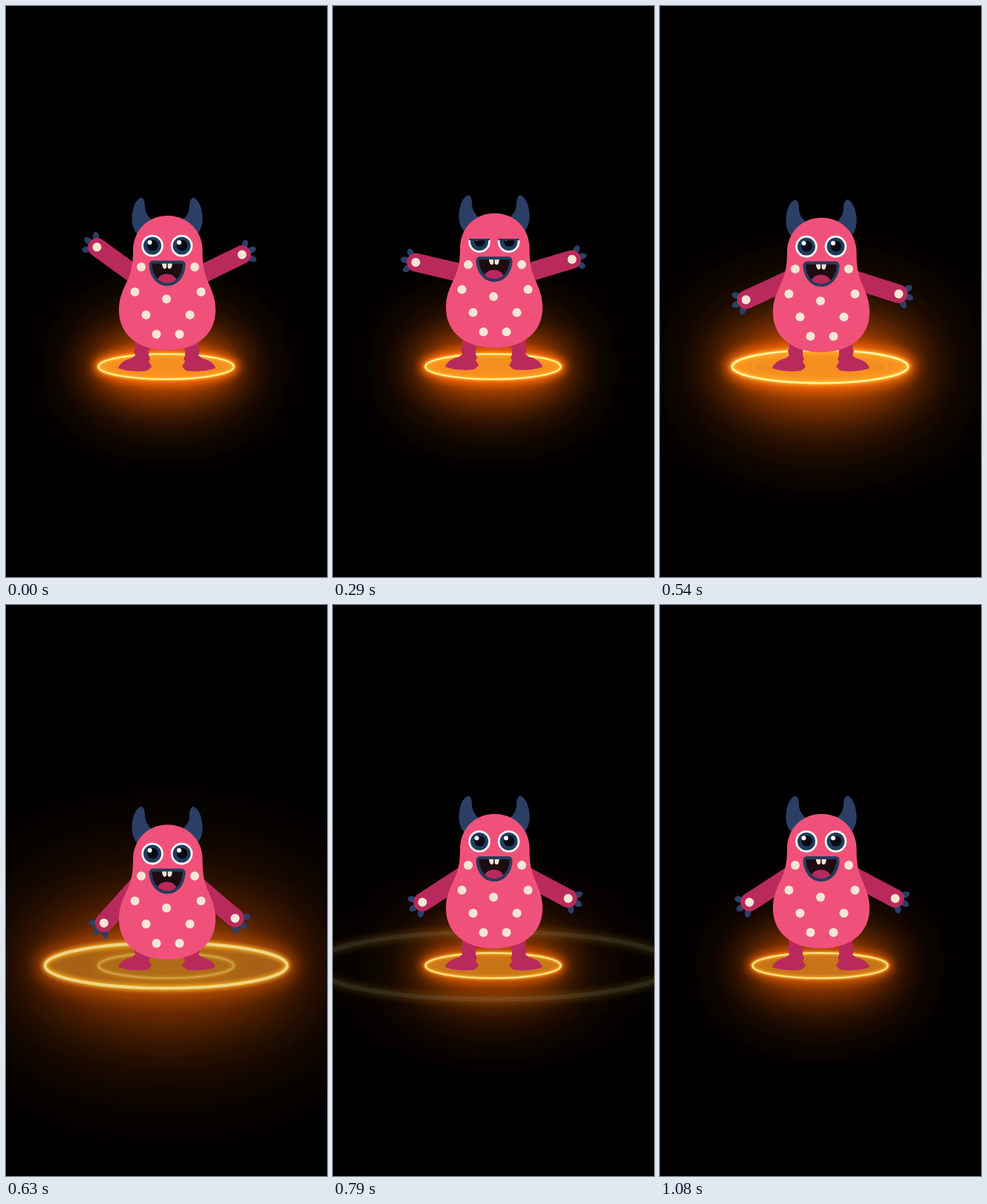
These frames come from a looping animation (432x768 px, 1.12 s). An HTML page:

```html
<!DOCTYPE html>
<html lang="en">
<head>
<meta charset="utf-8">
<title>Jumping monster</title>
<style>
  html, body { margin: 0; width: 100%; height: 100%; overflow: hidden; background: #000; }
  svg { display: block; width: 100%; height: 100%; }
  .light { mix-blend-mode: screen; }
  .limb { fill: #b92a5c; }
  .horn { fill: #2b3f66; }
  .skin { fill: #f0517a; }
  .cream { fill: #f8e6d4; }
</style>
</head>
<body>
<svg viewBox="0 0 432 768">
  <defs>
    <filter id="wide" x="-150%" y="-300%" width="400%" height="700%"><feGaussianBlur stdDeviation="46"/></filter>
    <filter id="mid" x="-100%" y="-300%" width="300%" height="700%"><feGaussianBlur stdDeviation="24"/></filter>
    <filter id="near" x="-50%" y="-200%" width="200%" height="500%"><feGaussianBlur stdDeviation="6"/></filter>
    <filter id="soft" x="-20%" y="-60%" width="140%" height="220%"><feGaussianBlur stdDeviation="1.5"/></filter>
    <clipPath id="eyeClip"><circle r="16"/></clipPath>
    <path id="mouthShape" d="M198 340H236Q240 340 239.500 345C238 360 229 370 217 370C205 370 196 360 194.500 345Q194 340 198 340Z"/>
    <clipPath id="mouthClip"><use href="#mouthShape"/></clipPath>

    <g id="halo">
      <ellipse rx="110" ry="58" fill="#963c00" filter="url(#wide)"/>
      <ellipse rx="98" ry="30" fill="#ff6206" opacity=".85" filter="url(#mid)"/>
      <ellipse rx="91" ry="17" fill="none" stroke="#ff6a08" stroke-width="14" filter="url(#near)"/>
      <ellipse rx="91" ry="17" fill="#ffa228" fill-opacity=".75"/>
    </g>
    <g id="line" fill="none">
      <ellipse rx="91" ry="17" stroke="#ffb820" stroke-width="4.500" filter="url(#soft)"/>
      <ellipse rx="91" ry="17" stroke="#fff2a0" stroke-width="2.200"/>
    </g>

    <path id="leg" class="limb" d="M172 425H194L192 470L194 475L192 478L196 485L191 490C181 493 160 491 151 487C153 480 162 475 169 474L174 470L172 464L174 460Z"/>
    <path id="horn" class="horn" d="M182 256.500C186 258 187 263 187 268C187 276 191 283 198 288L177 306C171 300 169 291 169.500 283C170 272 174 259 182 256.500Z"/>
    <ellipse id="claw" class="horn" cx="-14.500" rx="6.500" ry="4.200"/>
    <g id="arm">
      <g transform="translate(-67)">
        <use href="#claw"/>
        <use href="#claw" transform="rotate(47)"/>
        <use href="#claw" transform="rotate(-47)"/>
      </g>
      <rect class="limb" x="-79.500" y="-12.500" width="92" height="25" rx="12.500"/>
      <circle class="cream" cx="-67.500" r="6"/>
    </g>
    <g id="eye">
      <circle r="14.800" fill="#fffaf4"/>
      <circle r="12" fill="#213c5e"/>
      <circle cx=".5" cy="-.5" r="7.300" fill="#080b14"/>
      <circle cx="-3.500" cy="-4.500" r="3" fill="#fffaf4"/>
      <g clip-path="url(#eyeClip)">
        <g class="lid">
          <rect class="skin" x="-17" y="-34" width="34" height="34"/>
          <path d="M-14 0H14" stroke="#22365a" stroke-width="2.200"/>
        </g>
      </g>
    </g>
  </defs>

  <g id="wave" class="light"><use href="#halo"/><use href="#line"/></g>
  <g id="ring" class="light"><use href="#halo"/><use href="#line"/></g>

  <g id="feet">
    <use href="#leg"/>
    <use href="#leg" transform="translate(433) scale(-1 1)"/>
  </g>
  <g id="body">
    <use id="armL" href="#arm"/>
    <use id="armR" href="#arm"/>
    <use href="#horn"/>
    <use href="#horn" transform="translate(434) scale(-1 1)"/>
    <path class="skin" d="M217.500 281C190 281 171 302 171 328C171 345 169 356 163 369C156 384 152 393 152 408C152 444 182 462 217 462C252 462 282 444 282 408C282 393 278 384 271.500 369C266 356 264.500 345 264.500 328C264.500 302 245 281 217.500 281Z"/>
    <g id="spots" class="cream"></g>
    <g id="face">
      <use class="eye" href="#eye" x="197" y="318"/>
      <use class="eye" href="#eye" x="236.500" y="318"/>
      <g clip-path="url(#mouthClip)">
        <rect x="190" y="336" width="54" height="38" fill="#1e0c12"/>
        <ellipse class="limb" cx="216.500" cy="367" rx="13.500" ry="11"/>
        <path class="cream" d="M209.500 340H216V346Q216 349 213.500 349Q210.500 349 209.500 340ZM217.500 340H224Q223.500 349 220.500 349Q217.500 349 217.500 346Z"/>
      </g>
      <use href="#mouthShape" fill="none" stroke="#263c5e" stroke-width="4"/>
    </g>
  </g>
</svg>

<script>
const LOOP = 1120, STEP = 1000 / 24;
const LAUNCH = 290, LANDING = 492, REST = 790;
const BEATS = [0, 140, 385, 625, REST]; // start, crouch, apex, squash, rest
const NS = 'http://www.w3.org/2000/svg';
const $ = id => document.getElementById(id);
const place = (id, transform) => $(id).setAttribute('transform', transform);
const clamp = x => Math.max(0, Math.min(1, x));
const ramp = (t, from, to) => clamp((t - from) / (to - from));

function addSpot(cx, cy) {
  const dot = document.createElementNS(NS, 'circle');
  for (const [k, v] of Object.entries({ cx, cy, r: 6 })) dot.setAttribute(k, v);
  $('spots').append(dot);
}
addSpot(216, 393);
for (const [dx, y] of [[36, 350], [44.5, 383.5], [29.5, 414.5], [15.5, 440.5]]) {
  addSpot(218 - dx, y);
  addSpot(218 + dx, y);
}
const lid = document.querySelector('.lid');

// Cosine easing through one value per beat.
function swing(t, values) {
  const i = BEATS.findIndex(b => b > t);
  if (i < 0) return values[values.length - 1];
  const p = ramp(t, BEATS[i - 1], BEATS[i]);
  return values[i - 1] + (values[i] - values[i - 1]) * (1 - Math.cos(Math.PI * p)) / 2;
}

function bodyY(t) {
  if (t < LAUNCH) return 1 + 16 * Math.sin(Math.PI * t / LAUNCH);
  if (t < LANDING) return -260 * ramp(t, LAUNCH, LANDING) * ramp(t, LANDING, LAUNCH);
  return 15 * Math.sin(Math.PI * ramp(t, LANDING, REST)) ** 2;
}

function light(id, opacity, scale) {
  const [halo, line] = $(id).children;
  place(id, `translate(215.5 485) scale(${scale})`);
  halo.setAttribute('opacity', opacity ** 2);
  line.setAttribute('opacity', opacity);
}

function draw(time) {
  const t = Math.floor((time % LOOP + 3.4) / STEP) * STEP;
  const y = bodyY(t);
  const stretch = Math.min(5.5, Math.max(0, -y * 0.2));

  place('body', `translate(0 ${y})`);
  place('feet', `translate(0 ${Math.min(0, y + stretch)})`);
  const shoulder = 363 - 1.5 * stretch;
  place('armL', `translate(177 ${shoulder}) rotate(${swing(t, [36, -40, 38, -48, -33])})`);
  place('armR', `translate(257 ${shoulder}) scale(-1 1) rotate(${swing(t, [26, -42, 44, -40.5, -28])})`);
  place('face', `translate(0 ${swing(t, [3.5, 0.5, 1.5, 2, 0])})`);
  const blink = clamp(2 * Math.sin(Math.PI * ramp(t, 0, 330)));
  lid.setAttribute('transform', `translate(0 ${-20 + 24 * blink})`);

  light('wave', ramp(t, 830, 580), 1 + 1.67 * ramp(t, 500, 792) ** 0.88);
  light('ring', 0.9 * ramp(t, 530, 760), 1);
}

const start = performance.now();
function tick() {
  draw(performance.now() - start);
  requestAnimationFrame(tick);
}
tick();
</script>
</body>
</html>
```
